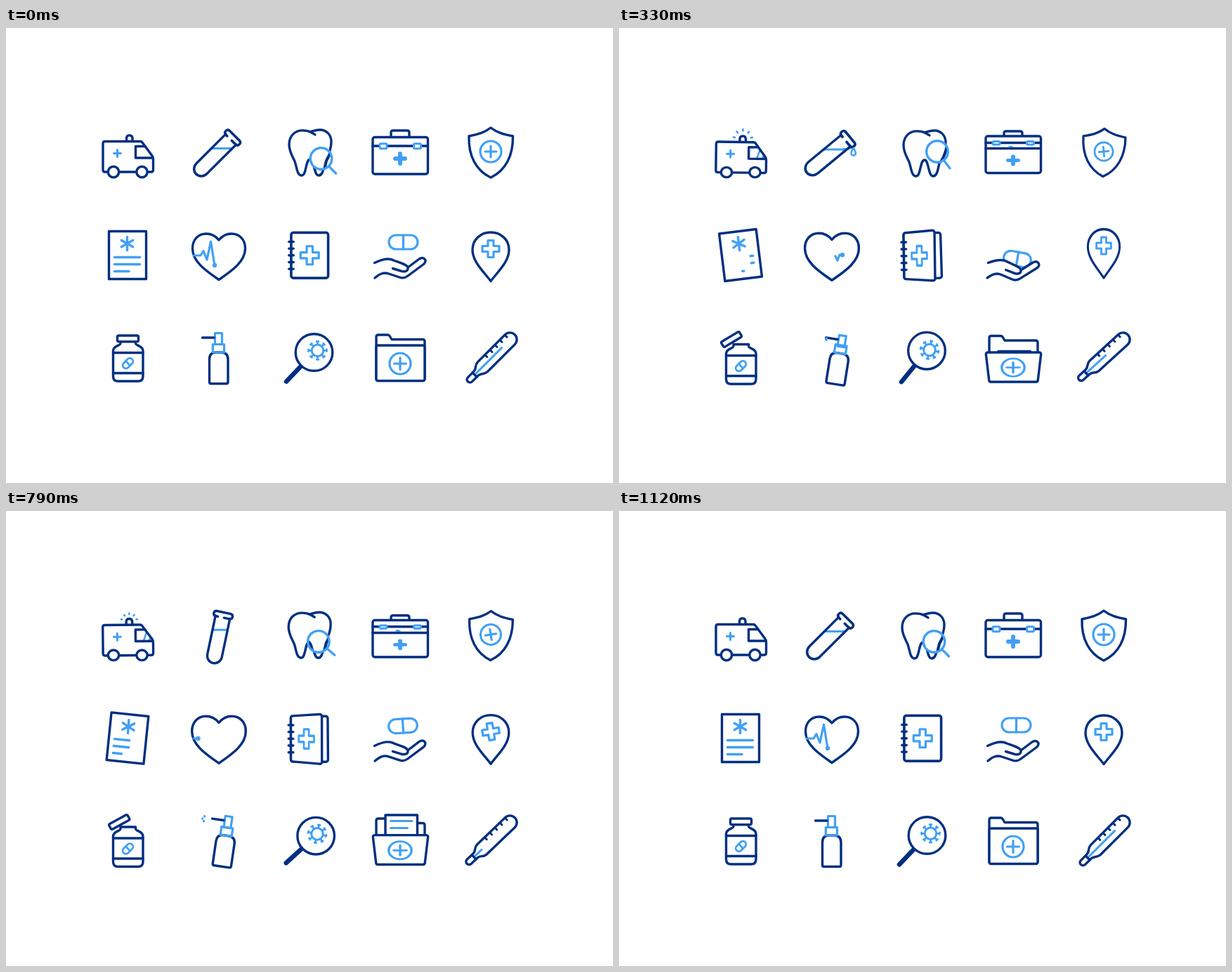
These frames come from a looping animation (864 by 648 pixels, 1160 ms). An HTML page with a canvas:

```html
<!DOCTYPE html>
<html lang="en">
<head>
<meta charset="utf-8">
<title>Medical icons</title>
<style>
html, body { margin: 0; width: 100%; height: 100%; overflow: hidden; background: #fff; }
canvas { display: block; width: 864px; height: 648px; }
</style>
</head>
<body>
<canvas id="stage" width="864" height="648"></canvas>
<script>
const c = document.getElementById('stage').getContext('2d');
const NAVY = '#002f80', BLUE = '#41a0f5', WHITE = '#fff';
const LOOP = 1160, STEPS = 28;
const POSES = [0, 4, 8, 12, 16, 21, 27, 28];
let step = 0;

// Eased value between six poses; the loop closes on the first one.
function v(...a) {
  a.push(a[0], a[0]);
  let i = 0;
  while (i < 6 && step >= POSES[i + 1]) i++;
  const u = (step - POSES[i]) / (POSES[i + 1] - POSES[i]);
  return a[i] + (a[i + 1] - a[i]) * u * u * (3 - 2 * u);
}

function draw(d, color = NAVY, fill, width = 3.4) {
  const p = typeof d === 'string' ? new Path2D(d) : d;
  if (fill) { c.fillStyle = fill; c.fill(p); }
  c.strokeStyle = color;
  c.lineWidth = width;
  c.stroke(p);
}

// Turn, scale and shift a drawing around the pivot (x, y).
function move(x, y, { dx = 0, dy = 0, r = 0, sx = 1, sy = sx }, fn) {
  c.save();
  c.translate(x + dx, y + dy);
  c.rotate(r * Math.PI / 180);
  c.scale(sx, sy);
  c.translate(-x, -y);
  fn();
  c.restore();
}

function box(x, y, w, h, r) {
  const p = new Path2D();
  p.roundRect(x, y, w, h, r);
  return p;
}

function disc(x, y, rx, ry = rx) {
  const p = new Path2D();
  p.ellipse(x, y, rx, ry, 0, 0, 7);
  return p;
}

function poly(r, pts) {
  const p = new Path2D(), n = pts.length;
  p.moveTo((pts[0][0] + pts[1][0]) / 2, (pts[0][1] + pts[1][1]) / 2);
  for (let i = 1; i <= n; i++) p.arcTo(...pts[i % n], ...pts[(i + 1) % n], r);
  p.closePath();
  return p;
}

const mix = (a, b, u) => [a[0] + (b[0] - a[0]) * u, a[1] + (b[1] - a[1]) * u];
const plus = (x, y, a) => `M${x - a} ${y}h${2 * a}M${x} ${y - a}v${2 * a}`;
const cross = (x, y, a, b) => `M${x - b} ${y - a}h${2 * b}v${a - b}h${a - b}v${2 * b}h${b - a}v${a - b}` +
  `h${-2 * b}v${b - a}h${b - a}v${-2 * b}h${a - b}z`;

function pill(x, y, w, h, r, width) {
  move(x, y, { r }, () => {
    draw(box(x - w / 2, y - h / 2, w, h, h / 2), BLUE, WHITE, width);
    draw(`M${x} ${y - h / 2}v${h}`, BLUE, '', width);
  });
}

function ambulance() {
  const sink = v(0, 1, 1, 0, 0, 1), g = v(0, .3, 1, 0, 0, 1);
  move(173, 190, { dy: sink, r: v(0, 1, .8, 0, 0, -1) }, () => {
    const glass = 'M209 185H184.5V168.5H198';
    c.save();
    c.clip(new Path2D('M209 185H184.5V168.5H198Z'));
    const x = v(216, 216, 200, 191, 170, 216);
    draw(`M${x - 4} 185l6 -17M${x + 4} 185l6 -17`, BLUE, '', 2.6);
    c.restore();
    draw('M145 205H141Q138 205 138 202V164.5Q138 161.5 141 161.5H191Q193 161.5 194 163L208 182Q209.5 184 209.5 187V202Q209.5 205 206.5 205H202M161 205H185');
    draw(glass);
    draw('M171.5 161V156.5A4.3 4.3 0 0 1 180 156.5V161');
    draw(plus(158.5, 178.5, 5), BLUE, '', 3);
    if (g > .1) for (let i = -2; i <= 2; i++) {
      if (Math.abs(i) === 2 && g < .5) continue;
      const a = i * (30 + 10 * g) * Math.PI / 180, s = Math.sin(a), k = Math.cos(a);
      const r = 9 + 2.5 * g, q = 9 + 4.7 * g;
      draw(`M${175.8 + s * r} ${157 - k * r}L${175.8 + s * q} ${157 - k * q}`, BLUE, '', 2.6);
    }
  });
  for (const x of [153, 193.5]) draw(disc(x, 205 + sink / 2, 7.7, 7.7 - sink * .6), NAVY, WHITE);
}

function testTube() {
  const pose = {
    dx: v(300.5, 300.5, 301, 303.5, 304, 302.5), dy: v(178.2, 178.5, 178.5, 176.5, 176, 177.8),
    r: v(45, 47.5, 50.5, 2, 0, 18.3), sy: v(1.07, 1.08, 1.1, 1, 1, 1.03), sx: 1
  };
  const y = v(171.5, 172, 173, 169, 168.5, 169.5), tilt = v(0, 0, 0, -1, 0, 0), spill = v(0, 0, 1, 0, 0, 0);
  const inside = new Path2D();
  const turn = new DOMMatrix().translate(pose.dx, pose.dy).rotate(pose.r).scale(1, pose.sy);
  inside.addPath(new Path2D('M-10.5 -26V29A10.5 10.5 0 0 0 10.5 29V-26Z'), turn);
  c.save();
  c.clip(inside);
  draw(`M270 ${y - tilt * 2}L340 ${y + tilt * 2}`, BLUE, '', 3);
  c.restore();
  if (spill > .5) draw(`M318 ${y}Q328 ${y} 334 168`, BLUE, '', 3);
  move(0, 0, pose, () => {
    draw('M-10.5 -26V29A10.5 10.5 0 0 0 10.5 29V-26');
    draw('M-7 -25.5H-10.5A3.7 3.7 0 0 1 -10.5 -32.8H10.5A3.7 3.7 0 0 1 10.5 -25.5H2');
  });
  const size = v(0, 0, .55, 1.1, 1.1, 0);
  if (size > .1 && step < 16) {
    c.save();
    c.beginPath();
    c.rect(320, 100, 30, 118);
    c.clip();
    move(0, 0, { dx: 333.7, dy: v(170, 170, 176, 212, 240, 170) }, () =>
      draw(`M0 ${-9 * size}C${3 * size} ${-4 * size} ${6 * size} 0 ${6 * size} ${4 * size}A${6 * size} ${6 * size} 0 0 1 ${-6 * size} ${4 * size}C${-6 * size} 0 ${-3 * size} ${-4 * size} 0 ${-9 * size}Z`, BLUE, '', 2 + size));
    c.restore();
  }
}

function tooth() {
  const x = v(448.5, 448.5, 453, 449, 441, 447), y = v(186, 186, 176, 168, 182, 188);
  const shape = () => move(0, 0, { dx: v(0, 0, 2, 2, -.5, -1), dy: v(0, 0, 1, 1, -.5, -1) }, () =>
    draw('M440 152C436 149 430 146 424 146C411 145 403 154 403 166C403 176 408 183 411 190C414 198 414 210 421 210C428 210 426 187 433 187C439 187 438 210 445 210C452 210 452 197 455 188C459 181 463 172 463 162C463 151 455 145 447 145C440 145 437 147 433 148'));
  shape();
  c.save();
  c.clip(disc(x, y, 15.3));
  c.fillStyle = WHITE;
  c.fillRect(x - 20, y - 20, 40, 40);
  move(x, y, { sx: 1.2 }, shape);
  c.restore();
  draw(disc(x, y, 15.3), BLUE);
  move(x, y, { r: v(45, 45, 53, 55, 40, 40) }, () => draw(`M${x + 15.3} ${y}h14.5`, BLUE));
}

function firstAid() {
  const o = v(0, .05, .5, 1, 1, .3), lid = 168 - 6 * o, front = 168 + 10 * o, h = 7 - 5 * o;
  move(0, 0, { dy: v(0, .5, -1.5, 0, 0, 0) }, () => {
    const top = 146 + 5 * o;
    draw(`M548 155V${top + 3}Q548 ${top} 551 ${top}H571Q574 ${top} 574 ${top + 3}V155`);
    draw(box(522, 155.5, 78.5, 52.5, 3));
    draw(`M522 ${lid}H600.5M522 ${front}H600.5`);
    c.save();
    c.beginPath();
    c.rect(524, lid + 1, 75, front - lid - 2.5);
    c.clip();
    move(0, 0, { dy: (1 - o) * 8 }, () =>
      draw('M544 172Q539 173 542 176L545 179M556 167Q561 166 561 171T564 179M572 179A5 5 0 0 1 582 179', BLUE, '', 3));
    c.restore();
    for (const x of [537, 585.5]) draw(box(x - 5, lid + .3 - h / 2, 10, h, 1.5), BLUE, h > 4 ? WHITE : BLUE, 3);
    move(561, 186, { dy: 8 * o, sx: 1, sy: 1 - .4 * o }, () => draw(plus(561, 186, 7), BLUE, '', 6));
  });
}

function shield() {
  move(690, 177, { r: v(0, 2, 2, -8, 2, 0), sx: v(1, .96, .96, 1.03, .96, 1) }, () =>
    draw('M690 142C681 149 672 151.5 659 154C658 182 669 203 690 213C711 203 722 182 721.5 154C708 151.5 699 149 690 142Z'));
  move(690, 176, { r: v(0, 0, -5, 8, 0, -15), sx: v(1, .96, .87, 1.13, .9, 1) }, () => {
    draw(disc(690, 176, 15), BLUE, '', 3.2);
    draw(plus(690, 176, 8), BLUE, '', 3.2);
  });
}

function report() {
  move(173, 323.5, { r: v(0, -1.5, -7, 0, 0, 9) }, () => {
    draw('M146.5 289.5H199.5V357.5H146.5Z');
    move(172.5, 307, { r: v(0, 0, 0, 0, -5, 0) }, () => {
      for (let i = 0; i < 3; i++) move(172.5, 307, { r: i * 60 }, () => draw('M172.5 297.5v19', BLUE));
    });
    const early = step < 14;
    const from = early ? v(0, .05, .9, 1, 1, 1) : 0, to = early ? 1 : v(1, 1, 1, 0, 0, .92);
    if (to - from > .02) [36, 36, 20.5].forEach((w, i) =>
      draw(`M${154.5 + w * from} ${326.5 + i * 10}h${w * (to - from)}`, BLUE));
  });
}

function heart() {
  move(303, 325, { sx: v(1, 1.025, 1.025, 1.025, 1.025, 1.02) }, () =>
    draw('M303 358.5C285 346 265.5 333 265.5 314C265.5 301 274 293 285 293C293 293 299 297 303 302C307 297 313 293 321 293C332 293 340.5 301 340.5 314C340.5 333 321 346 303 358.5Z'));
  const pulse = 'M267 324H277L281 317.5L286 330L291.5 304L297 338L304 318L308 325L311 331L314 323L323.5 323.5L340 324';
  const early = step < 16;
  const head = early ? v(92, 121.4, 140.6, 146, 170, 170) : v(92, 0, 0, 0, 0, 10);
  const tail = early ? v(0, 57.7, 121.4, 145.9, 170, 170) : 0;
  if (head < 1 || head > 160) return;
  c.setLineDash([head - tail, 999]);
  c.lineDashOffset = -tail;
  draw(pulse, BLUE, '', 3.2);
  c.setLineDash([.1, 999]);
  c.lineDashOffset = -head + .1;
  draw(pulse, BLUE, '', 6.4);
  c.setLineDash([]);
}

function notebook() {
  const tl = [v(406, 406, 405, 403.5, 403.5, 406.5), v(291.5, 291.5, 292, 292, 292, 292)];
  const tr = [v(458.5, 460, 449, 445, 445, 452), v(291.5, 293, 288, 286, 286, 291)];
  const br = [v(458.5, 457, 450, 451, 451, 449), v(356, 358, 360, 358.5, 358.5, 361.5)];
  const bl = [v(406, 405, 406, 407.5, 407.5, 404.5), v(356, 355.5, 357.5, 357, 357, 356.5)];
  const backTop = [v(458.5, 459.5, 457.5, 455, 455, 459.5), v(291.5, 293, 291.5, 289, 289, 294)];
  const backLow = [v(458.5, 457.5, 459.5, 461, 461, 457), v(356, 357, 356, 354, 354, 359)];
  draw(poly(3, [tl, backTop, backLow, bl]));
  draw(poly(3, [tl, tr, br, bl]), NAVY, WHITE);
  const l = mix(tl, bl, .5), r = mix(tr, br, .5), t = mix(tl, tr, .5), b = mix(bl, br, .5), m = mix(l, r, .5);
  const ax = (r[0] - l[0]) / 52.5, ay = (r[1] - l[1]) / 52.5;
  for (let i = 0; i < 5; i++) {
    const [x, y] = mix(tl, bl, .2 + i * .15);
    draw(`M${x - 3.3} ${y - ay * 3}l6.6 ${ay * 6}`);
  }
  c.save();
  c.transform(ax, ay, (b[0] - t[0]) / 64.5, (b[1] - t[1]) / 64.5, ...m);
  draw(cross(0, 0, 13, 4.2), BLUE, '', 3.2);
  c.restore();
}

function hand() {
  pill(v(565.5, 566, 567, 567, 566, 564.5), v(305, 306, 329, 335.5, 317, 300),
    v(41, 41, 39, 37, 40, 41), 20, v(0, 2, 10, 11, -3, -4), 3.2);
  move(525, 345, { r: v(0, 0, 4.5, 5, 0, -.5) }, () => {
    const palm = 'C536 329 545 327 552 331C560 334 571 337 572 341';
    c.fillStyle = WHITE;
    c.fill(new Path2D(`M524.5 334.5${palm}L588 329L596 335L572 353Q567 358 560 355L545 350C537 347 531 351 525 356Z`));
    draw(`M524.5 334.5${palm}C573 347 566 347.5 562 346L550.5 342.5`);
    draw('M525 356C531 351 537 347 545 350L560 355Q566 357.5 572 353L595 336C600 330 594 325 588 329L572 341');
  });
}

function pin() {
  const sx = v(1, 1, .87, 1, .98, 1), dy = v(0, 0, -4.5, 0, -1, 0);
  move(690, 326, { dy, sx, sy: 1 }, () =>
    draw('M690 360.5C680 347 664 333 664 316C664 301 676 291 690 291C704 291 716 301 716 316C716 333 700 347 690 360.5Z'));
  move(690, 314.5, { dy, sx, sy: 1, r: v(0, 0, 0, 0, -11, -8) }, () => draw(cross(690, 314.5, 12, 4), BLUE, '', 3.2));
}

function bottle() {
  const dy = v(0, -.5, 4, 7, 7, 1.5);
  pill(v(173, 173, 173, 179, 179, 174), v(470, 470, 464, 440, 440, 470), 11, 6.5, v(-45, -45, -50, -52, -32, -30), 2.8);
  pill(v(172, 172, 172, 168.5, 168.5, 172), v(475, 475, 470, 449, 449, 475), 11, 6.5, v(45, 45, 45, 52, 48, 45), 2.8);
  move(0, 0, { dy }, () => {
    draw('M163 446.5V449C163 453 152.5 452 152.5 460V496Q152.5 503 159.5 503H188Q195 503 195 496V460C195 452 184.5 453 184.5 449V446.5Z', NAVY, WHITE);
    draw('M152.5 462.5H195M152.5 491.5H195');
    pill(173.5, 477.5, 17, 9, -45, 2.8);
  });
  move(0, 0, { dx: v(173.5, 173.5, 160, 152.5, 152.5, 166), dy: v(442.3, 441.5, 443.5, 445, 445, 442), r: v(0, 0, -31, -50, -50, -17) }, () =>
    draw(box(-15, -4.3, 30, 8.6, 2), NAVY, WHITE));
}

function spray() {
  const r = v(0, 2, 9, 9, 9, 8);
  move(302.5, 484, { dx: v(0, 2, 8.5, 8.5, 8.5, 7), dy: v(0, 0, 1, 0, 0, 0), r }, () => {
    draw('M289.5 504V472Q289.5 462 299 462H306Q316 462 316 472V504Q316 506.5 313.5 506.5H292Q289.5 506.5 289.5 504Z');
    draw('M294.3 450.5H310.5V462H294.3Z', BLUE, '', 3.2);
    move(0, 0, { dy: v(0, 0, 2, 0, 0, 0) }, () => {
      draw('M297.5 434.5H307.5V450.5H297.5Z', BLUE, '', 3.2);
      draw('M279.5 441H296');
    });
  });
  const g = v(0, 0, .2, 1, 0, 1);
  if (g < .15) return;
  const x = v(295, 295, 295, 283, 283, 280.3), y = v(442, 442, 443, 437.5, 437.5, 438.3);
  for (const [a, b] of [[2.3, -5], [-2.3, 0], [.5, 5.8]]) {
    c.fillStyle = BLUE;
    c.fill(disc(x + a * g, y + b * g, 1.7));
  }
}

function microscopy() {
  const x = v(438.5, 438.5, 438, 439.5, 443.2, 440), y = v(462, 462, 459.7, 458.3, 462, 463);
  const ex = v(399, 399, 402, 406, 399, 398.5), ey = v(503.5, 503.5, 504, 504.5, 498, 503);
  const d = Math.hypot(ex - x, ey - y), ux = (ex - x) / d, uy = (ey - y) / d;
  draw(`M${x + ux * 29} ${y + uy * 29}L${ex} ${ey}`, NAVY, '', 6.5);
  draw(disc(x, y, 26.3));
  move(0, 0, { dx: v(443.5, 443.5, 442, 441.5, 442, 443.5), dy: v(459.3, 459.3, 458.5, 459.3, 460.5, 459.5), r: v(0, 2, 12, 20, 22, 6) }, () => {
    draw(disc(0, 0, 8.3), BLUE, '', 3);
    for (let i = 0; i < 8; i++) move(0, 0, { r: i * 45 }, () => draw('M9 0H12.7M12.9 -1.3V1.3', BLUE, '', 2.8));
  });
}

function folder() {
  move(0, 0, { dy: v(0, 1, 1.5, 0, 0, 1.5) }, () => {
    const top = v(452, 453, 460.5, 460, 460, 461), w = v(0, 0, 5, 5, 5, 5), cy = v(478, 478, 482, 482, 482, 482.5);
    draw('M527 500V440Q527 437 530 437H543Q545 437 546 438.5L549 443.5H593Q596 443.5 596 446.5V500');
    move(0, 0, { dy: v(38, 38, 27, 0, 0, 0) }, () => {
      c.save();
      c.beginPath();
      c.rect(530, 400, 70, 100 - v(38, 38, 27, 0, 0, 0));
      c.clip();
      draw('M540 495V432H585.5V495Z', NAVY, WHITE);
      draw('M547.5 440.5H578M547.5 450.5H571.5', BLUE, '', 3);
      c.restore();
    });
    draw(poly(2.5, [[527 - w, top], [596 + w, top], [596, 502.5], [527, 502.5]]), NAVY, WHITE);
    move(561, cy, { sx: v(1, 1, 1.08, 1.08, 1.08, 1.08), sy: v(1, 1, .85, .83, .83, .85) }, () => {
      draw(disc(561, cy, 15), BLUE, '', 3.2);
      draw(plus(561, cy, 8.5), BLUE, '', 3.2);
    });
  });
}

function thermometer() {
  move(0, 0, { dx: 717.3, dy: 443.7, r: -v(45, 45, 42.5, 49.5, 41.5, 45) }, () => {
    draw(`M-68 0H${-80.5 + v(64, 60, 47, 33, 20.5, 27)}`, BLUE, '', 3);
    draw('M-71 -4.3H-80.5A4.3 4.3 0 0 0 -80.5 4.3H-71Z');
    draw('M-71 -4.3H-68Q-65 -4.5 -62 -7T-55 -9.8H0A9.8 9.8 0 0 1 0 9.8H-55Q-59 9.5 -62 7T-68 4.3H-71');
    for (let i = 0; i < 5; i++) draw(`M${-40.5 + i * 10} -9.5v4`, NAVY, '', 3);
  });
}

const icons = [ambulance, testTube, tooth, firstAid, shield, report, heart, notebook, hand, pin,
  bottle, spray, microscopy, folder, thermometer];

function frame() {
  step = Math.floor((performance.now() % LOOP + 8) / LOOP * STEPS) % STEPS;
  c.fillStyle = WHITE;
  c.fillRect(0, 0, 864, 648);
  c.lineCap = c.lineJoin = 'round';
  icons.forEach(icon => icon());
  requestAnimationFrame(frame);
}
frame();
</script>
</body>
</html>
```
